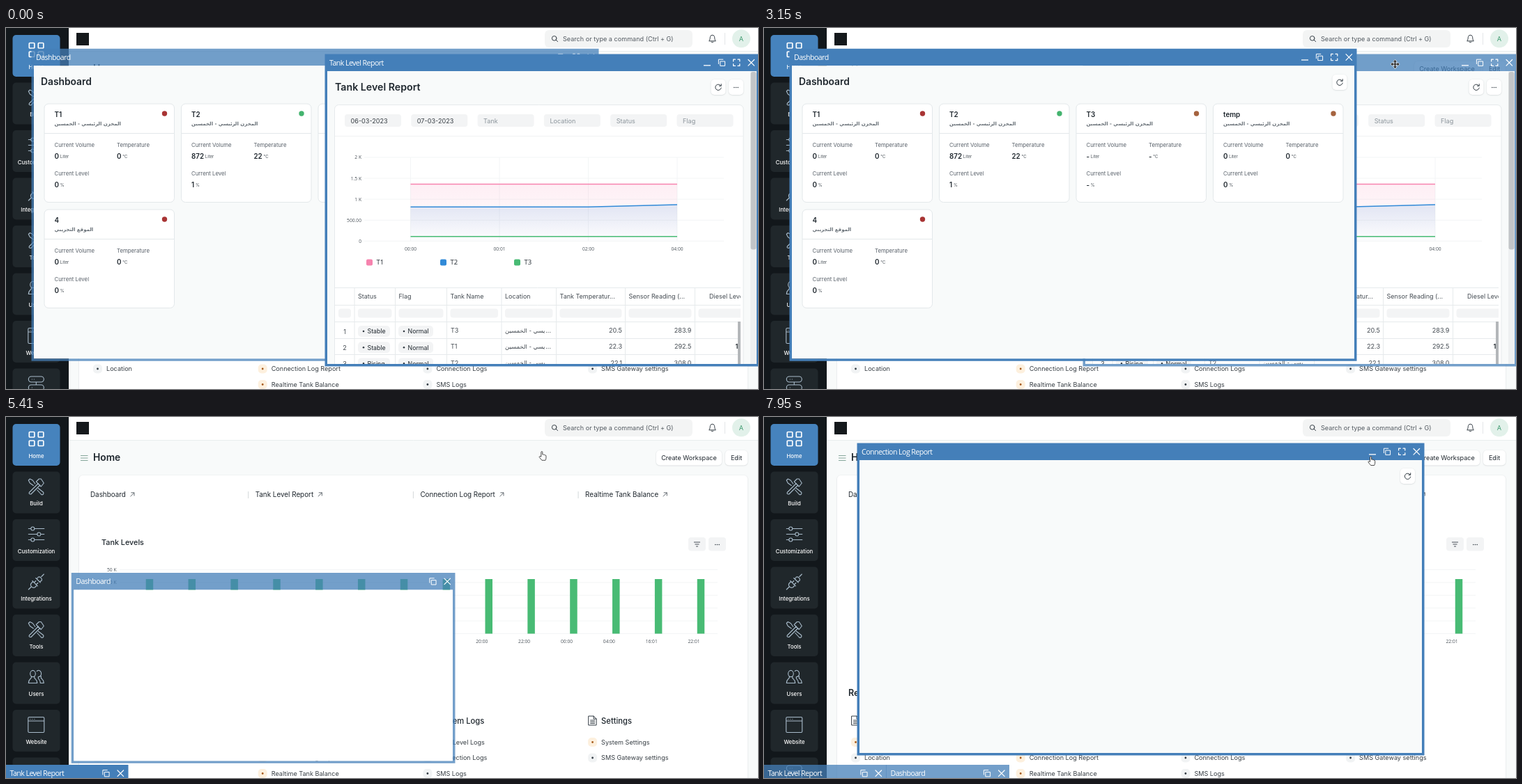
Animation, 1079 px wide and 519 px high, one loop 8000 ms. Source, as an HTML page with a canvas:

```html
<!DOCTYPE html>
<html lang="en">
<head>
<meta charset="utf-8">
<title>Tank dashboard</title>
<style>
  html, body { margin: 0; width: 100%; height: 100%; overflow: hidden; background: #fff; }
  canvas { display: block; width: 100vw; height: 100vh; }
</style>
</head>
<body>
<canvas id="stage"></canvas>
<script>
const W = 1079, H = 519, LOOP = 8000;
const INTER = 'Inter, sans-serif', OPEN = '"Open Sans", sans-serif', ARABIC = '"DejaVu Sans", sans-serif';
const INK = '#1f272e', SOFT = '#454c53', LABEL = '#4b535a', MUTE = '#8b949b', ICON = '#333c44';
const LINE = '#e6eaec', GRID = '#f3f5f6', FIELD = '#f3f4f5', PAGE = '#f8fafa';
const BLUE = '#447fb9', PINK = '#f683ae', SKY = '#318ad8', GREEN = '#48bb74', RED = '#a83434', BROWN = '#a5633f';
const PLACE = 'المخزن الرئيسي - الخمسين', TRIAL = 'الموقع التجريبي';

const canvas = document.getElementById('stage');
const c = canvas.getContext('2d');
const dpr = window.devicePixelRatio || 1;
canvas.width = Math.round(W * dpr);
canvas.height = Math.round(H * dpr);

// y is the middle of the capitals
function text(s, x, y, size, color = INK, weight = 400, align = 'left', font = INTER) {
  c.font = `${weight} ${size}px ${font}`;
  c.textAlign = align;
  c.fillStyle = color;
  c.fillText(s, x, y + size * 0.36);
}
function box(x, y, w, h, r, fill, stroke) {
  c.beginPath();
  c.roundRect(x, y, w, h, r);
  if (fill) { c.fillStyle = fill; c.fill(); }
  if (stroke) { c.strokeStyle = stroke; c.lineWidth = 1; c.stroke(); }
}
function line(color, width, ...p) {
  c.beginPath();
  for (let i = 0; i < p.length; i += 2) c.lineTo(p[i], p[i + 1]);
  c.strokeStyle = color;
  c.lineWidth = width;
  c.stroke();
}
function dot(x, y, r, color) {
  c.beginPath();
  c.arc(x, y, r, 0, Math.PI * 2);
  c.fillStyle = color;
  c.fill();
}
function icon(d, x, y, color, width = 1, fill) {
  c.save();
  c.translate(x, y);
  c.lineJoin = c.lineCap = 'round';
  const p = new Path2D(d);
  if (fill) { c.fillStyle = fill; c.fill(p); }
  c.strokeStyle = color;
  c.lineWidth = width;
  c.stroke(p);
  c.restore();
}
function clipped(x, y, w, h, draw) {
  c.save();
  c.beginPath();
  c.rect(x, y, w, h);
  c.clip();
  draw();
  c.restore();
}
function raised(x, y, w, h, fill = '#fff') {
  c.save();
  c.shadowColor = 'rgba(25,39,52,.18)';
  c.shadowBlur = 2 * dpr;
  c.shadowOffsetY = 0.5 * dpr;
  box(x, y, w, h, 5, fill);
  c.restore();
}
function refresh(x, y) {
  raised(x - 10.5, y - 11, 21, 22);
  icon('M3.6-2A4.2 4.2 0 1 0 4.2 1M4.2-4.4V-1.7H1.5', x, y, ICON);
}
function dots(x, y) {
  for (let i = -1; i <= 1; i++) dot(x + i * 2.7, y, 0.8, ICON);
}

// Sidebar
const TOOLS = 'M-10 8.5L3-4.5M-7.5 11L5.5-2M-10 8.5Q-11 11-7.5 11M0-7L4-11H7L11-5L7 0ZM-4-1.5L-9-5L-11-9L-9-11L-5-9L-1.5-4M3 2.5L10 8a2 2 0 0 1-3 3L1.5 5';
const SQUARE = 'h5.5a1 1 0 0 1 1 1v5.5a1 1 0 0 1-1 1h-5.5a1 1 0 0 1-1-1v-5.5a1 1 0 0 1 1-1z';
const KNOB = 'a2.5 2.5 0 1 1-5 0a2.5 2.5 0 1 1 5 0';
const DISK = 'h14a4 4 0 0 1 0 8h-14a4 4 0 0 1 0-8z';
const TILES = [
  ['Home', ['M-9-10', 'M4-10', 'M-9 2.5', 'M4 2.5'].map(p => p + SQUARE).join('')],
  ['Build', TOOLS],
  ['Customization', `M-11-8h3.5M-2.5-8h14M-11 0h12.5M6.5 0h5M-11 8h3.5M-2.5 8h14M-2.5-8${KNOB}M6.5 0${KNOB}M-2.5 8${KNOB}`],
  ['Integrations', 'M-11 11L-7.5 7.5M11-11L7.5-7.5M-5.5-1.5L2 6M-4.5-.5L-7.5 2.5A4.2 4.2 0 0 0-2 8L1 5M-3 1L-.5-1.5M0 4L2.5 1.5M-.5-5.5L6 1M1-4L3-7A4.2 4.2 0 0 1 8-2L5 0'],
  ['Tools', TOOLS],
  ['Users', 'M-1-5a3.8 4.6 0 1 1-7.6 0a3.8 4.6 0 1 1 7.6 0M-7-1.5V1C-8 3-11 3-11 8.5H1.5C1.5 3-2 3-2.5 1V-1.5M1-8.5A3.8 4.6 0 1 1 3-.5V1.5C4 4 6 4 6 8.5H11C11 3 7.5 3 7 1V-1.5'],
  ['Website', 'M-10-11h20a1.5 1.5 0 0 1 1.5 1.5v19a1.5 1.5 0 0 1-1.5 1.5h-20a1.5 1.5 0 0 1-1.5-1.5v-19a1.5 1.5 0 0 1 1.5-1.5zM-11-5.5h22.5M-8.5-8.3h.1M-5.5-8.3h.1M-2.5-8.3h.1'],
  ['', `M-7-10${DISK}M-7 2${DISK}M-6-6h.1M-3-6h.1M-6 6h.1M0-2v4`],
];
function sidebar() {
  c.fillStyle = '#12171b';
  c.fillRect(0, 0, 90, H);
  TILES.forEach(([name, d], i) => {
    const y = 10 + i * 68.5;
    box(9.5, y, 68, 60, 5, i ? '#20272b' : '#4683bd');
    icon(d, 43.3, y + 21.5, i ? '#a9bccb' : '#fff', i ? 1.1 : 1.7);
    text(name, 43.5, y + 46, 7.8, '#fff', 500, 'center');
  });
}

// Home page
const LINKS = ['Dashboard', 'Tank Level Report', 'Connection Log Report', 'Realtime Tank Balance'];
const HOURS = '05:34 06:00 08:00 10:00 12:00 14:00 16:00 18:00 20:00 22:00 00:00 04:00 16:01 22:01'.split(' ');
// a leading star marks an orange bullet
const GROUPS = [
  ['Setup', '*Tank', 'Location'],
  ['Reports', '*Tank Level Report', '*Connection Log Report', '*Realtime Tank Balance'],
  ['System Logs', 'Tank Level Logs', 'Connection Logs', 'SMS Logs'],
  ['Settings', '*System Settings', 'SMS Gateway settings'],
];
function legend(names, colors, x, y) {
  names.forEach((n, i) => {
    box(x + i * 106, y - 4.5, 9, 9, 2, colors[i]);
    text(n, x + i * 106 + 14.5, y, 9.5, INK, 400, 'left', OPEN);
  });
}
function tick(s, x, y, align) {
  text(s, x, y, 6.7, LABEL, 400, align, OPEN);
}
function topbar() {
  c.fillStyle = '#fff';
  c.fillRect(90, 0, W - 90, 33);
  line('#e9eded', 1, 90, 33.5, W, 33.5);
  box(101, 7, 18, 18, 0, '#15191c');
  box(773, 3, 212, 25, 6, '#f3f4f4');
  icon('M3 0a3.3 3.3 0 1 1-6.6 0a3.3 3.3 0 1 1 6.6 0M2.2 2.4L4.6 4.8', 787, 14.8, ICON);
  text('Search or type a command (Ctrl + G)', 799, 15.5, 9.1, '#545b62');
  icon('M-4.5 3.5C-3 2-3.5-1-3-2.5A3.1 3.1 0 0 1 3-2.5C3.5-1 3 2 4.5 3.5ZM-1.3 5.3Q0 6.4 1.3 5.3', 1013.5, 15, ICON);
  line('#e3e6e8', 1, 1031.5, 7, 1031.5, 24);
  dot(1055, 15.3, 13, '#e2f1ea');
  text('A', 1055, 15.5, 9.2, '#3f9b70', 400, 'center');
}
function home(hover) {
  c.fillStyle = PAGE;
  c.fillRect(90, 0, W - 90, H);
  topbar();
  for (const y of [55.5, 59, 62.5]) line('#86a79b', 1, 107, y, 117.5, y);
  text('Home', 125, 58, 13.8, INK, 600);
  raised(933, 48, 94, 21.5, hover ? '#f4f5f5' : '#fff');
  text('Create Workspace', 980, 58.5, 9.1, INK, 400, 'center');
  raised(1032, 48, 32, 21.5);
  text('Edit', 1048, 58.5, 9.1, INK, 400, 'center');
  raised(105, 84, 959, 460);

  LINKS.forEach((s, i) => {
    const x = 121 + i * 236.7;
    text(s, x, 111.5, 9.85);
    icon('M0 5L5 0M1-.2H5.2V4', x + c.measureText(s).width + 7, 109, '#555d64', 0.9);
    if (i) line('#d3d8da', 1, x - 10, 107, x - 10, 117);
  });

  text('Tank Levels', 137, 180.5, 10.8, INK, 500);
  box(979, 173, 25, 19.5, 4, FIELD);
  box(1008, 173, 25, 19.5, 4, FIELD);
  [4.5, 3, 1.5].forEach((w, i) => line(ICON, 0.9, 991.5 - w, 180 + i * 3, 991.5 + w, 180 + i * 3));
  dots(1020.5, 183.5);
  for (let i = 0; i <= 5; i++) {
    const y = 311.5 - i * 18.4;
    line(GRID, 1, 163, y, 1021, y);
    tick(i ? i * 10 + ' K' : '0', 158.5, y, 'right');
  }
  HOURS.forEach((s, i) => {
    const x = 200.7 + i * 60.85;
    c.fillStyle = GREEN;
    c.fillRect(x, 233, 10.5, 78.5);
    tick(s, x - 4.7, 323, 'center');
  });
  legend(['T3', 'T1', 'T2'], ['#f59bb8', SKY, GREEN], 165, 342);

  text('Reports & Master', 121, 396.5, 12.6, INK, 600);
  GROUPS.forEach(([head, ...items], i) => {
    const x = 125 + i * 236.7;
    icon('M1 0H8L12 4V13H1ZM8 0V4H12M3.5 6H9.5M3.5 8.3H9.5M3.5 10.6H9.5', x, 430, ICON);
    text(head, x + 19, 436.5, 11.2, INK, 500);
    items.forEach((item, j) => {
      const y = 467.5 + j * 22.5, warm = item[0] === '*';
      box(x, y - 6.5, 13, 13, 5, warm ? '#fdf0de' : '#f1f3f4');
      dot(x + 6.5, y, 1.4, warm ? '#a85b1c' : ICON);
      text(warm ? item.slice(1) : item, x + 19, y, 9.1, '#383f45');
    });
  });
}

// Window contents
function tankCard(x, y, name, place, color, volume, temp, level) {
  box(x, y, 186.5, 141.5, 6, '#fff', '#e3e8ea');
  line('#e3e8ea', 1, x, y + 42.5, x + 186.5, y + 42.5);
  text(name, x + 14.5, y + 15, 9.9, INK, 600);
  text(place, x + 14.5, y + 28.5, 7, '#666e75', 700, 'left', ARABIC);
  dot(x + 172.5, y + 14, 3.7, color);
  const field = (label, value, unit, fx, fy) => {
    text(label, fx, fy, 7.8, '#59616a');
    text(value, fx, fy + 16, 9.8, INK, 600);
    text(unit, fx + c.measureText(value).width + 1.8, fy + 17, 6, LABEL);
  };
  field('Current Volume', volume, 'Liter', x + 14.5, y + 59);
  field('Temperature', temp, '°C', x + 104, y + 59);
  field('Current Level', level, '%', x + 14.5, y + 100);
}
function dashboard(alert) {
  text('Dashboard', 50, 77.5, 13.8, INK, 600);
  refresh(826, 78);
  tankCard(55, 109, 'T1', PLACE, RED, '0', '0', '0');
  tankCard(251.5, 109, 'T2', PLACE, '#43b36e', '872', '22', '1');
  tankCard(448, 109, 'T3', PLACE, alert, '-', '-', '-');
  tankCard(644.5, 109, 'temp', PLACE, alert, '0', '0', '0');
  tankCard(55, 261, '4', TRIAL, RED, '0', '0', '0');
}

function series(color, filled, ...p) {
  if (filled) {
    const g = c.createLinearGradient(0, p[1], 0, 306);
    g.addColorStop(0, color + '22');
    g.addColorStop(1, color + '02');
    c.beginPath();
    c.moveTo(580.5, 306);
    for (let i = 0; i < p.length; i += 2) c.lineTo(p[i], p[i + 1]);
    c.lineTo(963, 306);
    c.fillStyle = g;
    c.fill();
  }
  line(color, 1.4, ...p);
}
function report() {
  text('Tank Level Report', 472, 84.5, 14.2, INK, 600);
  refresh(1022, 85);
  raised(1037, 74, 21, 22);
  dots(1047.5, 85.5);
  box(471.5, 110.5, 586.5, 400, 6, '#fff', LINE);
  ['06-03-2023', '07-03-2023', 'Tank', 'Location', 'Status', 'Flag'].forEach((s, i) => {
    const x = 486 + i * 95.3;
    box(x, 124, 81, 18, 4, FIELD);
    text(s, x + 8.5, 133.3, 9.1, i < 2 ? '#383f45' : MUTE);
  });
  line('#f0f2f3', 1, 472, 155.5, 1058, 155.5);

  ['2 K', '1.5 K', '1 K', '500.00', '0'].forEach((s, i) => {
    const y = 186 + i * 30.1;
    line(GRID, 1, 514, y, 1030, y);
    tick(s, 510, y, 'right');
  });
  ['00:00', '00:01', '02:00', '04:00'].forEach((s, i) => {
    const x = 580.5 + i * 127.5;
    line(GRID, 1, x, 186, x, 306);
    tick(s, x, 318, 'center');
  });
  series(PINK, true, 580.5, 224.5, 963, 224.5);
  series(SKY, true, 580.5, 257.3, 835.5, 257.3, 963, 254);
  series(GREEN, false, 580.5, 299.8, 963, 299.8);
  legend(['T1', 'T2', 'T3'], [PINK, SKY, GREEN], 517, 337);
  clipped(471, 370, 583, 120, table);

  c.fillStyle = '#b4b7ba';
  c.fillRect(1050, 422, 4, 62);
  c.fillStyle = '#eef0f1';
  c.fillRect(1068, 62, 9, 422);
  box(1068.5, 63, 8, 255.5, 3, '#c2c5c8');
}
function table() {
  const cols = [472, 500, 558.5, 632.5, 711, 789.5, 888.5, 988.5, 1090];
  const heads = ['', 'Status', 'Flag', 'Tank Name', 'Location', 'Tank Temperatur...', 'Sensor Reading (...'];
  for (const y of [373.5, 398.5, 422.5, 446.5, 469.5]) line(LINE, 1, 471, y, 1054, y);
  for (let i = 0; i < 8; i++) {
    if (i) line(LINE, 1, cols[i], 373, cols[i], 490);
    if (heads[i]) text(heads[i], cols[i] + 5, 385.5, 9, SOFT);
    box(cols[i] + 5, 403.5, cols[i + 1] - cols[i] - 10, 13, 4, FIELD);
  }
  text('Diesel Level', 1009, 385.5, 9, SOFT);
  const rows = [['Stable', 'T3', '20.5', '283.9'], ['Stable', 'T1', '22.3', '292.5'], ['Rising', 'T2', '22.1', '308.0']];
  const pill = (s, x, y, w) => {
    box(x, y - 8, w, 16, 5, FIELD);
    dot(x + 8, y, 1.3, ICON);
    text(s, x + 13.5, y + 0.3, 8.8);
  };
  rows.forEach(([status, tank, temp, reading], i) => {
    const y = 436 + i * 23.2;
    text(i + 1, 486, y + 0.5, 9, SOFT, 400, 'center');
    pill(status, 505, y, 46);
    pill('Normal', 563, y, 50);
    text(tank, 638, y - 1, 9, SOFT);
    text('يسي - الخمسين', 716, y - 1, 8.5, SOFT, 400, 'left', ARABIC);
    text('...', 782, y - 1, 9, SOFT, 400, 'right');
    text(temp, 884, y - 1, 9.1, SOFT, 400, 'right');
    text(reading, 983.5, y - 1, 9.1, SOFT, 400, 'right');
  });
  text('1', 1046.5, 458.2, 9.1, INK, 600);
}

// Floating window: r is [x, y, width, height]
const EDGE = 3.5, BAR = 24.5;
function frame(r, title, active, bg, content, mini) {
  const [x, y, w, h] = r, right = x + w, cy = y + 12.3;
  const body = [x + EDGE, y + BAR, w - 2 * EDGE, Math.max(0, h - BAR - EDGE)];
  c.globalAlpha = active ? 1 : 0.75;
  c.beginPath();
  c.rect(x, y, w, h);
  c.rect(...body);
  c.fillStyle = BLUE;
  c.fill('evenodd');
  c.globalAlpha = 1;
  c.fillStyle = bg;
  c.fillRect(...body);
  if (content) clipped(...body, content);
  c.letterSpacing = '-0.55px';
  text(title, x + 6.5, cy, 10.6, '#fff', 500, 'left', OPEN);
  c.letterSpacing = '0px';
  icon('M-1.8-1.8H4.6V4.6H-1.8ZM-4.6 1.8V-4.6H1.8', right - (mini ? 32 : 53.5), cy, '#fff');
  icon('M-4.3-4.3L4.3 4.3M4.3-4.3L-4.3 4.3', right - 11.2, cy, '#fff', 1.2);
  if (mini) return;
  line('#fff', 1.3, right - 79.5, cy + 4, right - 69.5, cy + 4);
  icon('M-4.6-1.8V-4.6H-1.8M1.8-4.6H4.6V-1.8M4.6 1.8V4.6H1.8M-1.8 4.6H-4.6V1.8', right - 32.3, cy, '#fff', 1.2);
}

// Pointer: time, x, y, and the shape from then on
const PATH = [
  [390, 980, 497, 'arrow'], [810, 738, 365], [1140, 738, 365], [1460, 403.5, 138.5], [1720, 403.5, 138.5],
  [2490, 790, 78], [2900, 880, 57, 'move'], [3100, 905.5, 52], [3360, 905.5, 52], [3700, 731, 50], [4190, 985, 52],
  [4430, 1004, 52, 'hand'], [4560, 1004, 52], [4740, 922, 55.5], [4800, 902, 57, 'arrow'], [5010, 832, 52],
  [5270, 775, 46, 'hand'], [5370, 775, 46], [5440, 765, 52, 'arrow'], [5610, 730, 66], [5900, 690, 95],
  [6200, 650, 112, 'hand'], [6400, 650, 112, 'arrow'], [6600, 635.5, 115.5], [6920, 635.5, 115.5],
  [7700, 916, 66], [7870, 882, 58, 'hand'], [7950, 870.5, 57], [8000, 870.5, 57],
];
const ARROW = 'M0 0V9.2L2.2 7.3L3.7 10.7L5.2 10L3.7 6.7H6.6Z';
const HEADS = 'M0-6L2-3.5H.6V-.6H3.5V-2L6 0L3.5 2V.6H.6V3.5H2L0 6L-2 3.5H-.6V.6H-3.5V2L-6 0L-3.5-2V-.6H-.6V-3.5H-2Z';
const HAND = 'M-.9 7V.8A1 1 0 0 1 1.1 .8V4.2Q2.2 3.5 2.9 4.6Q4.2 3.9 4.7 5.2Q6.2 4.8 6.2 6.5V9Q6.2 10.5 5.2 12.5H.2Q-1.5 10.5-3.6 7.8Q-3.4 6.2-1.9 6.7Z';
function pointer(t) {
  if (t < PATH[0][0]) return;
  let i = 0, shape;
  for (let k = 0; k < PATH.length && PATH[k][0] <= t; k++) {
    i = k;
    shape = PATH[k][3] || shape;
  }
  const a = PATH[i], b = PATH[i + 1] || a;
  const p = b === a ? 0 : (t - a[0]) / (b[0] - a[0]), s = p * p * (3 - 2 * p);
  const x = a[1] + (b[1] - a[1]) * s, y = a[2] + (b[2] - a[2]) * s;
  if (shape === 'move') {
    icon(HEADS, x, y, '#fff', 1.6);
    icon(HEADS, x, y, '#222', 0.4, '#222');
  } else {
    icon(shape === 'hand' ? HAND : ARROW, x, y, '#222', 0.8, '#fff');
  }
}

const REPORT = [457.5, 37.5, 623, 449], REPORT_MIN = [-1, 500, 176.5, 25];
const DASH = [36.5, 29.7, 814, 449], DASH_MIN = [175, 500, 177, 25];
const LOG = [133.5, 37.5, 814, 449];
const DASH_FOCUS = 1720, REPORT_FOCUS = 3280, REPORT_HIDE = 4548, DASH_HIDE = 5354, LOG_OPEN = 6400, LOG_READY = 7300;

function shrink(from, to, t, start) {
  const p = Math.min(1, Math.max(0, (t - start) / 350)), e = 1 - (1 - p) ** 3;
  return from.map((v, i) => v + (to[i] - v) * e);
}
function draw(t) {
  c.setTransform(dpr, 0, 0, dpr, 0, 0);
  c.textBaseline = 'alphabetic';
  c.direction = 'ltr';
  home(t > 4640 && t < 4790);
  sidebar();
  const dashOn = t >= DASH_FOCUS && t < REPORT_FOCUS, logOn = t >= LOG_OPEN;
  const dashMin = t >= DASH_HIDE, reportMin = t >= REPORT_HIDE;
  const wins = [
    () => frame(shrink(DASH, DASH_MIN, t, DASH_HIDE), 'Dashboard', dashOn, dashMin ? '#fff' : PAGE,
      dashMin ? null : () => dashboard(t < REPORT_FOCUS ? BROWN : '#b83636'), dashMin),
    () => frame(shrink(REPORT, REPORT_MIN, t, REPORT_HIDE), 'Tank Level Report', !dashOn && !logOn, reportMin ? '#fff' : PAGE,
      reportMin ? null : report, reportMin),
  ];
  if (dashOn) wins.reverse();
  wins.forEach(w => w());
  if (logOn) {
    const ready = t >= LOG_READY;
    frame(LOG, 'Connection Log Report', true, ready ? PAGE : '#fff', ready ? () => refresh(923.5, 85) : null);
  }
  pointer(t);
}
function loop() {
  draw(performance.now() % LOOP);
  requestAnimationFrame(loop);
}
loop();
</script>
</body>
</html>
```
